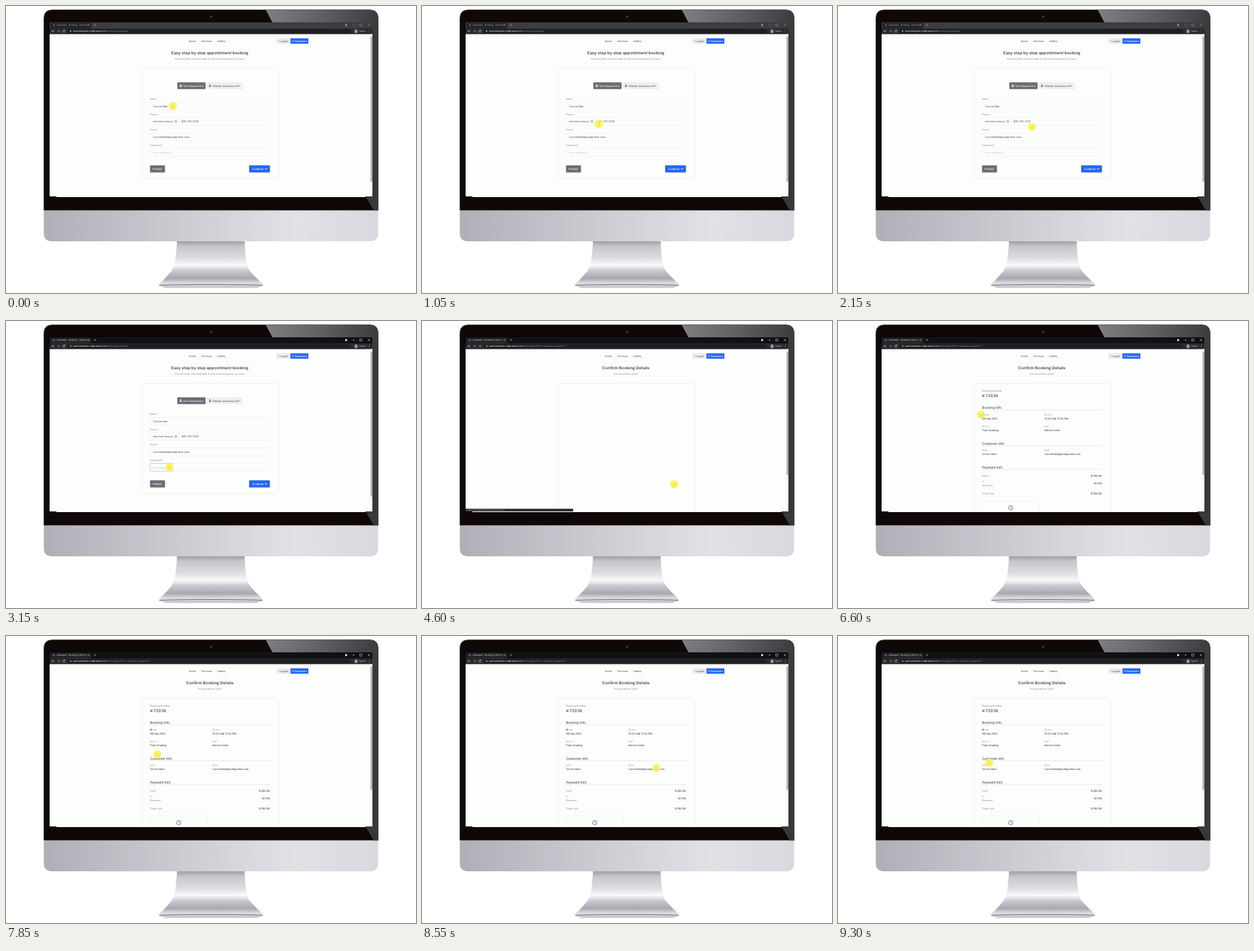
Animation, 602 px wide and 422 px high, one loop 9.35 s. Source, as an HTML page:

```html
<!DOCTYPE html>
<html lang="en">
<head>
<meta charset="utf-8">
<title>Booking demo</title>
<style>
html, body { margin: 0; width: 100%; height: 100%; overflow: hidden; background: #fff; }
svg { display: block; width: 100vw; height: 100vh; }
text { font-family: Inter, "Open Sans", sans-serif; text-rendering: geometricPrecision; }
</style>
</head>
<body>
<svg id="stage" viewBox="0 0 602 422" xmlns="http://www.w3.org/2000/svg">
  <defs>
    <linearGradient id="chin">
      <stop offset="0" stop-color="#b0afb7"/><stop offset=".35" stop-color="#c8c7ce"/>
      <stop offset=".75" stop-color="#e2e1e6"/><stop offset="1" stop-color="#d9d8de"/>
    </linearGradient>
    <linearGradient id="neck" x2="0" y2="1">
      <stop offset="0" stop-color="#9b9aa1"/><stop offset=".12" stop-color="#c6c5cb"/>
      <stop offset=".36" stop-color="#dcdbe0"/><stop offset=".52" stop-color="#fafafb"/>
      <stop offset=".64" stop-color="#c9c8cf"/><stop offset=".8" stop-color="#a9a8b0"/>
      <stop offset=".9" stop-color="#dddce1"/><stop offset="1" stop-color="#c2c1c8"/>
    </linearGradient>
    <linearGradient id="gloss" gradientUnits="userSpaceOnUse" x1="381" y1="5" x2="546" y2="50">
      <stop offset="0" stop-color="#808082"/><stop offset=".45" stop-color="#626264"/>
      <stop offset="1" stop-color="#38383a"/>
    </linearGradient>
    <clipPath id="bezel"><path d="M55.500 301V18Q55.500 5.500 68 5.500H534Q546.500 5.500 546.500 18V301Z"/></clipPath>
    <clipPath id="screen"><path d="M64 24H538V280H528V281H74V280H64Z"/></clipPath>
    <filter id="shadow" x="-10%" y="-10%" width="120%" height="120%">
      <feDropShadow dx="0" dy="0" stdDeviation="2.200" flood-color="#000" flood-opacity=".08"/>
    </filter>
  </defs>

  <path d="M251 345H350.500Q351 372 355 384Q358 391 373 405Q378 409 377 411L368 414.500H234L225 411Q224 409 229 405Q243 391 246 384Q250 372 251 345Z" fill="url(#neck)"/>
  <path d="M225 411Q235 409.500 301 409.500T377 411" fill="none" stroke="#77767d" stroke-width="1"/>
  <path d="M55.500 300.500H546.500V334Q546.500 346 534.500 346H67.500Q55.500 346 55.500 334Z" fill="url(#chin)"/>
  <g clip-path="url(#bezel)">
    <rect x="55" y="5" width="492" height="295.500" fill="#0f0806"/>
    <path d="M381 5H547V300.500H540L528 280Z" fill="url(#gloss)"/>
    <path d="M55.500 300V18Q55.500 5.500 68 5.500H534Q546.500 5.500 546.500 18V300" fill="none" stroke="#505052" stroke-width="1"/>
  </g>
  <circle cx="301" cy="16" r="1.800" fill="#27272b"/>
  <circle cx="301.500" cy="15.700" r=".7" fill="#77777d"/>

  <g clip-path="url(#screen)">
    <rect x="64" y="24" width="474" height="258" fill="#fcfefb"/>
    <g id="browser"></g>
    <g id="nav"></g>
    <g id="form"></g>
    <g id="confirm"></g>
    <g id="status"></g>
    <g id="cursor">
      <circle r="6" fill="#fbf44a" opacity=".86"/>
      <path d="M-.8 -1.500V2.500L.2 1.700L.9 3.200L1.500 2.900L.8 1.500L2 1.400Z" fill="#fffbd0" stroke="#6c651c" stroke-width=".3" opacity=".5"/>
    </g>
  </g>
</svg>
<script>
const LOOP = 9350, NAVIGATE = 4000, LOADED = 4800, FOCUS = 2850, ACTIVE = 2950;
const BLUE = '#2467f0', GREY = '#6d6c75', INK = '#45454d', SOFT = '#85858c', RULE = '#ececef';
const $ = id => document.getElementById(id);

const text = (x, y, size, str, fill = INK, weight = 400, anchor = 'start') =>
  `<text x="${x}" y="${y}" font-size="${size}" fill="${fill}" font-weight="${weight}" text-anchor="${anchor}">${str}</text>`;
const rect = (x, y, w, h, fill, r = 0, extra = '') =>
  `<rect x="${x}" y="${y}" width="${w}" height="${h}" rx="${r}" fill="${fill}" ${extra}/>`;
const line = (d, stroke, width = .5) =>
  `<path d="${d}" fill="none" stroke="${stroke}" stroke-width="${width}"/>`;
const ring = (x, y, r, stroke, width = .5) =>
  `<circle cx="${x}" cy="${y}" r="${r}" fill="none" stroke="${stroke}" stroke-width="${width}"/>`;
const person = (x, y, fill) =>
  `<circle cx="${x}" cy="${y - 1.1}" r="1" fill="${fill}"/><path d="M${x - 1.8} ${y + 1.7}q0-1.700 1.800-1.700t1.800 1.700z" fill="${fill}"/>`;
const field = (x, y, w) => rect(x, y, w, 11.5, '#fcfefb', .8, `stroke="${RULE}" stroke-width=".6"`);
const card = h => rect(201, 93, 198, h, '#fcfefb', 1, 'filter="url(#shadow)"');
const heading = (title, sub) =>
  text(299.3, 71.4, 5.95, title, INK, 600, 'middle') + text(299.3, 79.2, 3.6, sub, SOFT, 400, 'middle');

$('browser').innerHTML =
  rect(64, 24, 474, 9, '#101114', 0, 'id="strip"') +
  rect(65, 24.8, 60, 8.2, '#25262a', 1) +
  rect(64, 33, 474, 8.4, '#292a2e') +
  rect(90, 34.2, 415, 6, '#1d1e21', 3) +
  rect(69, 27, 2.4, 2.4, '#5560a8', .4) +
  `<g id="tab">${text(74.5, 29.4, 3.2, '', '#d5d5d8')}</g>` +
  line('M120.500 27l2 2m0-2l-2 2', '#b9b9bd') +
  line('M129 28h3.200m-1.600-1.600v3.200', '#b9b9bd') +
  `<g id="controls">
    <circle cx="499.500" cy="28" r="1.600" fill="#ededf0"/>` +
  line('M508.500 28h3.500M519.500 26.500h3v3h-3zM531.500 26.500l3 3m0-3l-3 3', '#ededf0') + '</g>' +
  line('M71 37h-3.400m1.500-1.500l-1.500 1.500l1.500 1.500', '#d4d4d7', .6) +
  line('M75.500 37h3.400m-1.500-1.500l1.500 1.500l-1.500 1.500', '#99999d', .6) +
  `<g id="reload">${line('M86.600 36a1.700 1.700 0 1 0 .2 1.500m-.1-2.500v1.200h-1.200', '#e2e2e5', .6)}</g>` +
  `<g id="stop">${line('M84 35.700l2.600 2.600m0-2.600l-2.600 2.600', '#e2e2e5', .6)}</g>` +
  rect(94, 36.4, 1.8, 1.6, '#b7b7bb') + line('M94.400 36.500v-.6a.5.5 0 0 1 1 0v.6', '#b7b7bb', .3) +
  `<text x="98.500" y="38.300" font-size="3.700" fill="#ececef">prothemyest.undpraud.com<tspan id="path" fill="#85868b"></tspan></text>` +
  ring(514, 37, 2.4, '#d4d4d7') + person(514, 37, '#d4d4d7') +
  text(518.5, 38.3, 3.4, 'Guest', '#d4d4d7') +
  [35.3, 37, 38.7].map(y => `<circle cx="533.500" cy="${y}" r=".4" fill="#d4d4d7"/>`).join('') +
  rect(535, 41.4, 3, 239.6, '#f0f0f1') +
  rect(535.4, 45, 2.2, 213, '#a5a6a9', 0, 'id="thumb"');

$('nav').innerHTML =
  text(268.5, 52.5, 3.7, 'Home') + text(287, 52.5, 3.7, 'Services') + text(310, 52.5, 3.7, 'Gallery') +
  rect(397, 47.5, 19, 8, '#ebebee', .8) + ring(400.8, 51.4, 1.1, '#aaaab0', .4) +
  text(403, 52.7, 3.4, 'Logout', INK) +
  rect(417.5, 47.5, 26.5, 8, BLUE, .8) + ring(421, 51.4, 1.1, '#fff', .4) +
  text(423.5, 52.7, 3.5, 'Dashboard', '#fff', 500);

const label = (y, str, star = '') =>
  text(211.5, y, 3.5, `${str} <tspan fill="#dd7780">${star}</tspan>`, SOFT);

$('form').innerHTML =
  heading('Easy step by step appointment booking', 'Choose staff, schedule date &amp; time to booking your services.') +
  card(159) +
  rect(251.5, 112.3, 41.5, 10, GREY, .8) + person(256.5, 117.3, '#fff') +
  text(260.3, 118.6, 3.7, 'New Registration', '#fff') +
  rect(294.5, 112.3, 53, 10, '#eeeeef', .8) + person(299.5, 117.3, GREY) +
  text(303.3, 118.6, 3.7, 'Already have account?') +
  label(138.3, 'Name') + field(211.5, 141.5, 176) + text(215.8, 148.7, 3.9, 'Corvin Hale') +
  label(160.9, 'Phone', '*') + field(211.5, 164, 42) + field(254, 164, 133.5) +
  text(215.8, 171.2, 3.5, 'American Samoa (') +
  '<path d="M248.700 169.400l.9-1.600l.9 1.600zm0 .8l.9 1.600l.9-1.600z" fill="#333"/>' +
  text(257.5, 171.3, 3.9, '555-010-0147') +
  label(183.3, 'Email', '*') + field(211.5, 186.6, 176) + text(215.8, 193.9, 3.9, 'CorvinHale@postquelve.com') +
  label(205.9, 'Password', '*') + field(211.5, 209.3, 176) + text(215.8, 216.5, 3.9, 'Your password', '#bcbcc1') +
  `<g id="focus">${line('M247 209.300H212.300q-.8 0-.8.8V220q0 .8.8.8H247', '#b5cbf6', .8)}</g>` +
  rect(211.5, 234.2, 22, 10.6, GREY, .8) +
  line('M218.800 239.500h-3.200m1.300-1.300l-1.300 1.300l1.300 1.300', '#fff', .6) + text(219.6, 240.9, 3.9, 'Back', '#fff', 500) +
  rect(357, 234.2, 30.5, 10.6, BLUE, .8) + text(361.5, 240.9, 3.9, 'Continue', '#fff', 500) +
  line('M379.700 239.500h3.200m-1.300-1.300l1.300 1.300l-1.300 1.300', '#fff', .6);

const section = (y, str) => text(211.5, y, 4.8, str, INK, 500) + line(`M211.500 ${y + 1.6}H387.500`, '#dadade', .6);
const pair = (x, y, name, value, dx = 0) =>
  text(x + dx, y, 2.9, name, SOFT) + text(x, y + 5.5, 3.8, value, INK, 500);
const cost = (y, name, value, vy = y) =>
  text(211.5, y, 3.7, name, SOFT) + text(387.5, vy, 3.7, value, INK, 600, 'end');

$('confirm').innerHTML =
  heading('Confirm Booking Details', 'You are almost done!') + card(210) + '<g id="details">' +
  text(211.5, 104.3, 3.7, 'Booking Number', SOFT) + text(211.5, 112.4, 5.9, '# 72038', INK, 500) +
  section(129.2, 'Booking Info') +
  rect(211.7, 136.4, 2.4, 2.4, '#77777f', .3) + pair(211.5, 139, 'Date', '28 Sep 2021', 3.5) +
  ring(304.6, 137.7, 1.2, '#77777f', .4) + pair(303, 139, 'Time', '12:00 AM-11:30 PM', 4) +
  pair(211.5, 156.3, 'Service', 'Floor Dusting') + pair(303, 156.3, 'Staff', 'Nerina Volsk') +
  section(181.6, 'Customer Info') +
  pair(211.5, 191.1, 'Name', 'Corvin Hale') + pair(303, 191.1, 'Email', 'CorvinHale@postquelve.com') +
  section(216.6, 'Payment Info') +
  cost(229, 'Price', '$ 350.00') + ring(212.9, 236, 1, '#9999a0', .4) +
  cost(242.6, 'Discount', '$ 0.00', 240) + cost(255.1, 'Total Cost', '$ 350.00') +
  rect(211.5, 264.8, 84, 20, 'none', .8, `stroke="${RULE}" stroke-width=".7"`) +
  ring(253.6, 274.6, 3.2, '#4b4b54', .7) + line('M253.600 272.600v2.100l1.400.9', '#4b4b54', .6) + '</g>';

$('status').innerHTML =
  rect(64, 276, 158, 4, '#303136') + text(66, 279.1, 3, 'Waiting for prothemyest.undpraud.com...', '#a9a9ae');

// Pointer stops: time, x, y
const stops = [
  [0, 245, 147], [450, 233, 151], [1000, 259.5, 173.5], [1150, 259.5, 173.5], [1800, 293, 171],
  [1950, 293, 171], [2750, 240, 215], [3200, 240, 215], [3700, 370, 240], [4800, 370, 240],
  [5600, 240, 110], [5750, 240, 110], [6150, 212, 108], [6550, 210, 138], [6700, 210, 138],
  [7100, 248, 142], [7550, 222, 174], [7900, 222, 174], [8500, 344, 194],
  [8650, 344, 194], [9200, 222, 186], [LOOP, 222, 186]
];

function pointer(t) {
  const i = stops.findIndex(s => s[0] > t);
  const [t0, x0, y0] = stops[i - 1], [t1, x1, y1] = stops[i];
  const p = (t - t0) / (t1 - t0), e = p * p * (3 - 2 * p);
  return [x0 + (x1 - x0) * e, y0 + (y1 - y0) * e];
}

const show = (id, on) => $(id).setAttribute('display', on ? 'inline' : 'none');
const tab = $('tab').firstChild;

function update(t) {
  const moved = t >= NAVIGATE, loaded = t >= LOADED, active = t >= ACTIVE;
  show('form', !moved);
  show('focus', t >= FOCUS);
  show('confirm', moved);
  show('details', loaded);
  show('status', moved && !loaded);
  show('stop', moved && !loaded);
  show('reload', !moved || loaded);
  tab.textContent = moved ? 'Quelvado - Booking Confirm -' : 'Quelvado - Booking - Business';
  tab.setAttribute('opacity', active ? 1 : .65);
  $('strip').setAttribute('fill', active ? '#101114' : '#3c3d40');
  $('controls').setAttribute('opacity', active ? 1 : .5);
  $('path').textContent = moved ? '/booking/confirm-yeasfacompany/-2' : '/booking/summary';
  $('thumb').setAttribute('height', moved ? 181 : 213);
  $('cursor').setAttribute('transform', `translate(${pointer(t)})`);
}

const start = performance.now();
function tick() {
  const t = (performance.now() - start) % LOOP;
  update(Math.floor(t / 50) * 50);
  requestAnimationFrame(tick);
}
tick();
</script>
</body>
</html>
```
